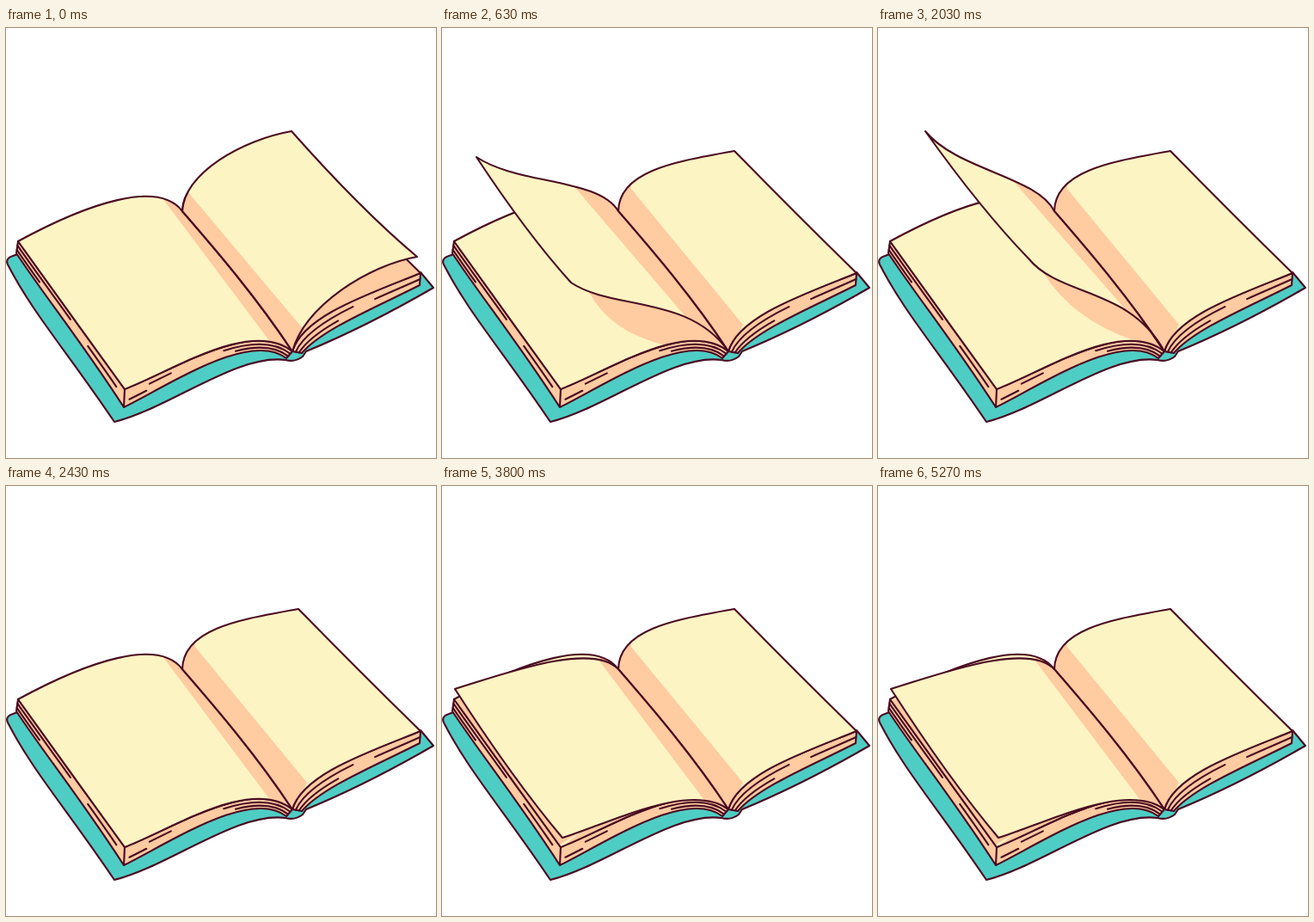
An HTML page for the animation above (5330 ms loop, 500 by 500 pixels).

```html
<!DOCTYPE html>
<html lang="en">
<head>
<meta charset="utf-8">
<title>Turning pages</title>
<style>
  html, body { margin: 0; width: 100%; height: 100%; overflow: hidden; background: #fff; }
  svg { display: block; width: 100vw; height: 100vh; }
  .line { fill: none; stroke: #4a0a22; stroke-width: 2.1; stroke-linecap: round; stroke-linejoin: round; }
  .paper { fill: #fdf4c3; }
  .shade { fill: #ffcba1; }
  .cover { fill: #4ecdc4; }
</style>
</head>
<body>
<svg viewBox="0 0 500 500">
  <defs>
    <path id="cover" d="M14 263C4 266 -1 268 2 275C30 330 70 375 126 458C190 442 270 378 325 386Q336 389 345 382L349 376C395 357 440 335 497 302L482 284L333 340Z"/>
    <path id="leftPage"/>
    <path id="rightPage"/>
    <path id="blocks"/>
    <clipPath id="inLeft"><use href="#leftPage"/></clipPath>
    <clipPath id="inRight"><use href="#rightPage"/></clipPath>
  </defs>

  <use href="#cover" class="cover"/>
  <use href="#cover" class="line"/>
  <use href="#blocks" class="shade"/>
  <use href="#blocks" class="line"/>
  <path class="line" id="grain"/>

  <use href="#leftPage" class="paper"/>
  <path class="shade" id="leftFold"/>
  <g clip-path="url(#inLeft)"><path class="shade" id="under"/></g>
  <use href="#leftPage" class="line"/>

  <use href="#rightPage" class="paper"/>
  <g clip-path="url(#inRight)"><path class="shade" id="cast"/></g>
  <use href="#rightPage" class="line"/>

  <g id="turn">
    <path class="paper" id="sheet"/>
    <path class="shade" id="fold"/>
    <path class="line" id="edge"/>
  </g>
</svg>

<script>
const LOOP = 5330;
const TURN = 43.77;  // ticks from one turn to the next, 30 ticks a second
const POSE = 2.41;   // ticks each pose is held
const REST = 13;     // pose at which the sheet has settled

const hinge = [205, 213];
const foot = [333, 376];
const spine = "C292 314 245 259 205 213Z";

// Pose, free top corner, free bottom corner.
const path = [
  [1, 332, 120, 478, 266],
  [4, 238, 48, 391, 177],
  [5, 187, 40, 322, 171],
  [7, 89, 84, 222, 232],
  [8, 55, 120, 175, 268],
  [9, 40, 150, 150, 296],
  [12, 15, 236, 140, 409]
];

// A sheet is three cubics: hinge to tip, tip to corner, corner to foot.
const left = {
  top: [hinge, [177, 176], [95, 204], [14, 248]],
  outer: [[14, 248], [48, 295], [98, 365], [138, 420]],
  bottom: [[138, 420], [195, 398], [285, 338], foot]
};
const right = {
  top: [hinge, [206, 165], [275, 155], [340, 143]],
  outer: [[340, 143], [388, 192], [436, 240], [482, 285]],
  bottom: [[482, 285], [420, 310], [345, 335], foot]
};

// Lower edges of the stacked pages.
const leftSide = [[12, 262], [46, 313], [90, 368], [137, 441]];
const leftBase = [[137, 441], [195, 412], [285, 352], [326, 384]];
const rightBase = [[481, 299], [430, 325], [368, 350], [344, 378]];

const set = (id, d) => document.getElementById(id).setAttribute("d", d);
const mix = (p, q, t) => p.map((a, i) => a + (q[i] - a) * t);
const add = (p, x, y) => [p[0] + x, p[1] + y];
const curve = c => `C${c.slice(1).join(" ")}`;
const flip = c => [...c].reverse();

function polar(p, degrees, length) {
  const a = degrees * Math.PI / 180;
  return add(p, length * Math.cos(a), length * Math.sin(a));
}

// First part of a cubic, up to t.
function part([a, b, c, d], t) {
  const ab = mix(a, b, t), bc = mix(b, c, t), cd = mix(c, d, t);
  const abc = mix(ab, bc, t), bcd = mix(bc, cd, t);
  return [a, ab, abc, mix(abc, bcd, t)];
}
const piece = (c, from, to) => flip(part(flip(part(c, to)), 1 - from / to));
const pointOn = (c, t) => part(c, t)[3];

const outline = s => `M${hinge}${curve(s.top)}${curve(s.outer)}${curve(s.bottom)}${spine}`;

// Shaded band beside the spine.
function foldOf(s, topWidth, bottomWidth) {
  const t = part(s.top, topWidth), b = flip(part(flip(s.bottom), bottomWidth));
  return `M${hinge}${curve(t)}L${b[0]}${curve(b)}${spine}`;
}

function slope(i) {
  const a = path[Math.max(i - 1, 0)], b = path[Math.min(i + 1, path.length - 1)];
  return a.map((p, j) => (b[j] - p) / (b[0] - a[0]));
}

// Smooth run of the free corners through the key points.
function cornersAt(step) {
  let i = 0;
  while (i < path.length - 2 && step > path[i + 1][0]) i++;
  const a = path[i], b = path[i + 1], h = b[0] - a[0];
  const u = (step - a[0]) / h, v = 1 - u;
  const m = slope(i), n = slope(i + 1);
  const p = a.map((q, j) => v * v * (1 + 2 * u) * q + u * u * (3 - 2 * u) * b[j]
    + h * u * v * (v * m[j] - u * n[j]));
  return [p.slice(1, 3), p.slice(3)];
}

// The free end curls round steadily while the bound end swings over.
function sheetAt(step) {
  const [tip, corner] = cornersAt(step);
  const curl = 187 - 17 * step;
  const lift = 55 + 33 * Math.sin(Math.PI * (step - 1) / 11);
  return {
    top: [hinge, polar(hinge, -82 - 4.3 * step, 45), polar(tip, curl, 58), tip],
    outer: [tip, add(mix(tip, corner, 1 / 3), -2, 4), add(mix(tip, corner, 2 / 3), -1, 7), corner],
    bottom: [corner, polar(corner, curl, 58), polar(foot, -68 - 6.3 * step, lift), foot]
  };
}

// Shadow on the right page: a straight band that swells under a raised sheet.
function castAt(step) {
  const r = Math.max(0, (6.9 - step) * 0.35);
  const end = [350 + 130 * Math.max(0, r - 1) ** 2, 345];
  const c = [[220 + 160 * r, 187 - 45 * r], [263 + 217 * r, 240 - 60 * r], [307 + 110 * r, 292 - 80 * r], end];
  return `M${foot}L${hinge}L205 100L${c[0]}${curve(c)}Z`;
}

// Shadow on the left page, running out as the sheet comes down.
function underAt(step, s) {
  if (step < 7) return "";
  const w = Math.max(0, 0.8 - 0.2 * (step - 8));
  const drop = 16 * (1 - w) ** 4;
  const start = pointOn(s.bottom, 0.13);
  const end = pointOn(left.bottom, 1 - Math.min(1, 1 - w));
  const bend = add(mix(start, end, 0.5), -20, 16);
  return `M${hinge}L${add(s.top[3], -drop, drop)}L${add(s.outer[3], -drop, drop)}L${start}Q${bend} ${end}L${foot}Z`;
}

function drawBook() {
  set("leftPage", outline(left));
  set("rightPage", outline(right));
  set("leftFold", foldOf(left, 0.2, 0.16));
  set("blocks",
    `M${left.top[3]}L${leftSide[0]}${curve(leftSide)}${curve(leftBase)}L${foot}`
    + `${curve(flip(left.bottom))}L${leftSide[3]}L${left.outer[3]}${curve(flip(left.outer))}Z`
    + `M${right.outer[3]}L${rightBase[0]}${curve(rightBase)}L${foot}${curve(flip(right.bottom))}Z`);

  // Page lines lie between the upper and lower edge of a stack.
  const grain = (a, b, depth, from, to) => {
    const c = piece(a.map((p, i) => mix(p, b[i], depth)), from, to);
    return `M${c[0]}${curve(c)}`;
  };
  let d = "";
  for (const depth of [0.35, 0.7]) {
    d += grain(left.outer, leftSide, depth, 0, 0.8 - 0.8 * depth);
    d += grain(left.bottom, leftBase, depth, 0.5 + 0.2 * depth, 1);
    d += grain(left.bottom, leftBase, depth, 0.28 - 0.35 * depth, 0.42 - 0.4 * depth);
    d += grain(right.bottom, rightBase, depth, 0.3 + 0.4 * depth, 1);
  }
  d += grain(left.outer, leftSide, 0.5, 0.68, 0.93);
  d += grain(right.bottom, rightBase, 0.5, 0, 0.3);
  set("grain", d);
}

function stepAt(ms) {
  const tick = Math.floor((Math.floor(ms / 10) + 0.5) * 0.3) + 0.5;
  return Math.min(REST, 1 + Math.floor(tick % TURN / POSE));
}

function draw(ms) {
  const step = stepAt(ms % LOOP);
  const turning = step < REST;
  document.getElementById("turn").style.display = turning ? "" : "none";
  set("cast", castAt(step));
  set("under", "");
  if (!turning) return;
  const s = sheetAt(step);
  const swell = Math.exp(-(((step - 8.5) / 2) ** 2));
  set("under", underAt(step, s));
  set("sheet", outline(s));
  set("edge", outline(s));
  set("fold", foldOf(s, 0.17 + 0.23 * swell, 0.17 + 0.13 * swell));
}

drawBook();
const begin = performance.now();
function frame() {
  draw(performance.now() - begin);
  requestAnimationFrame(frame);
}
frame();
</script>
</body>
</html>
```
